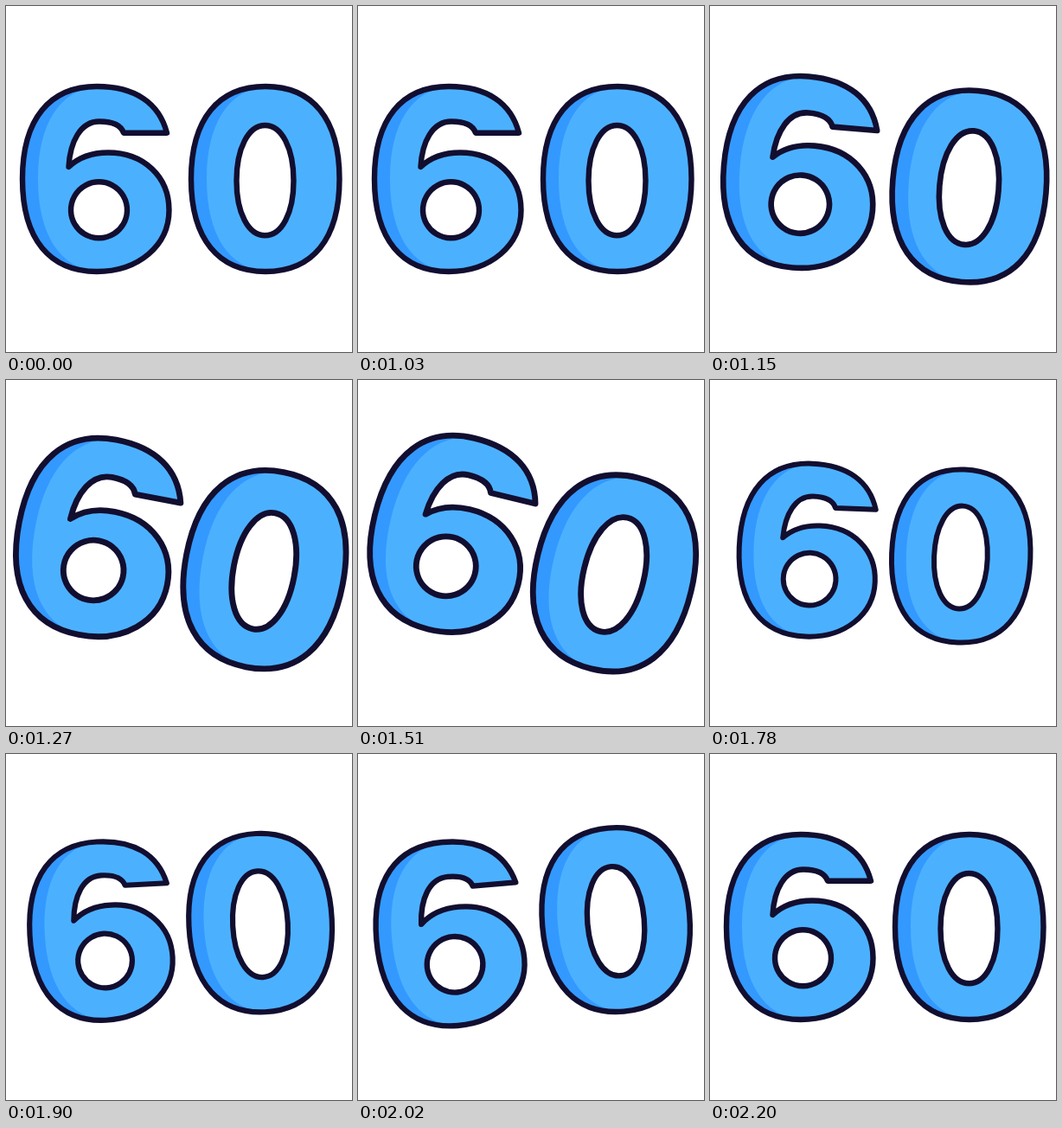
Recreate the animation shown at these times as an HTML page. Size 400 by 400 pixels, loop 2230 ms.

```html
<!DOCTYPE html>
<html>
<head>
<meta charset="utf-8">
<style>
html, body { margin: 0; width: 100%; height: 100%; overflow: hidden; background: #fff; }
svg { display: block; width: 100%; height: 100%; }
</style>
</head>
<body>
<svg id="stage" viewBox="0 0 400 400"></svg>
<script>
const LOOP = 2230;
const TIMES = [1030, 1270, 1510, 1780, 2005, 2200];
const ANGLE = [0, 10.9, 13.6, 2.3, -5, 0];
const SPREAD = [1, 1.01, 0.995, 0.905, 0.985, 1];
const SIZE = [1, 1.072, 1.062, 0.935, 0.993, 1];

// Each digit is drawn around its own centre; the left side is shared.
const EDGE = 'C-54 107 -86 70 -86 0S-54 -107 0 -107Z';
const SHADE = 'C-42 103 -68 65 -68 0S-42 -103 0 -107Z';
const digits = [
  {
    x: 105,
    right: 'M0 -107C44 -107 72 -88 81 -53.3L31 -53.3C28 -62 18 -66.5 3 -66.5' +
      'C-19 -66.5 -31 -43 -32.5 -14C-22 -24 -6 -30.5 13 -30.5' +
      'C54 -30.5 83.5 -3 83.5 36C83.5 77 48 107 0 107',
    hole: 'M2.5 3.3a32.5 32.5 0 1 0 .01 0Z'
  },
  {
    x: 300,
    right: 'M0 -107C54 -107 85.5 -70 85.5 0S54 107 0 107',
    hole: 'M-.5 -62C19 -62 32.5 -35 32.5 2S19 65.3 -.5 65.3S-33.5 39 -33.5 2S-20 -62 -.5 -62Z'
  }
];

const stage = document.getElementById('stage');
stage.innerHTML = digits.map(({ right, hole }) => {
  const outline = right + EDGE + hole;
  return `<g fill-rule="evenodd" stroke-linejoin="round">
    <path d="${outline}" fill="#3399ff"/>
    <path d="${right + SHADE + hole}" fill="#4bb1ff"/>
    <path d="${outline}" fill="none" stroke="#120e30" stroke-width="6.4"/>
  </g>`;
}).join('');
const groups = [...stage.children];

// Smooth curve through the keys, flat at every peak and at both ends.
function slope(values, i) {
  if (i === 0 || i === values.length - 1) return 0;
  const before = (values[i] - values[i - 1]) / (TIMES[i] - TIMES[i - 1]);
  const after = (values[i + 1] - values[i]) / (TIMES[i + 1] - TIMES[i]);
  return before * after <= 0 ? 0 : 2 * before * after / (before + after) * 1.25;
}

function sample(values, time) {
  const next = TIMES.findIndex(t => t > time);
  if (next < 1) return values[0];
  const i = next - 1, span = TIMES[next] - TIMES[i];
  const u = (time - TIMES[i]) / span, v = 1 - u;
  return v * v * (1 + 2 * u) * values[i] + u * u * (1 + 2 * v) * values[next] +
    u * v * span * (v * slope(values, i) - u * slope(values, next));
}

function draw(now) {
  const time = now % LOOP;
  const angle = sample(ANGLE, time);
  const spread = sample(SPREAD, time);
  const size = sample(SIZE, time);
  groups.forEach((group, i) => {
    const x = (digits[i].x - 200) * spread;
    group.setAttribute('transform',
      `translate(200 200) rotate(${angle}) translate(${x} 0) scale(${size})`);
  });
  requestAnimationFrame(draw);
}
draw(performance.now());
</script>
</body>
</html>
```
